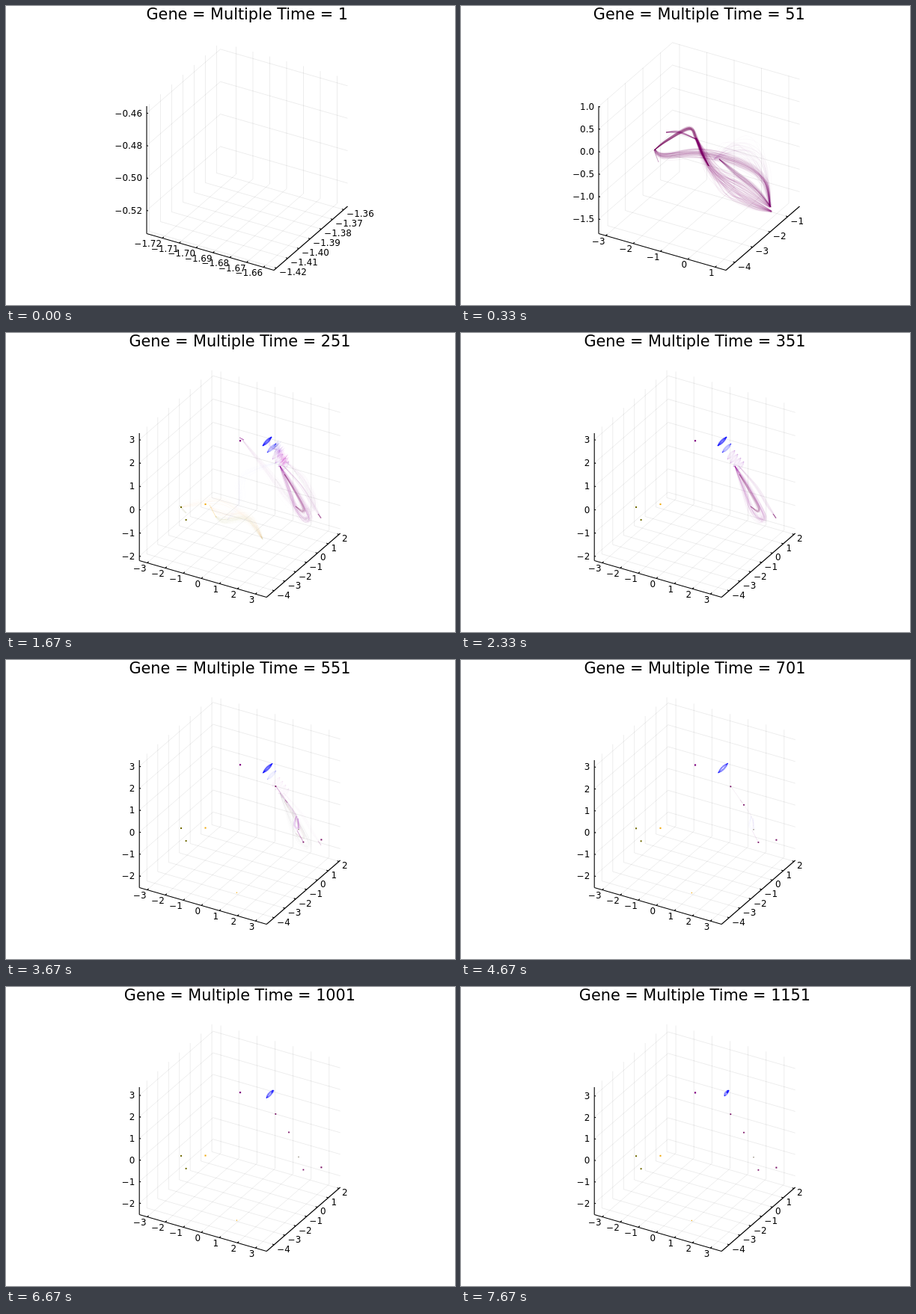
Recreate the animation shown at these times as an HTML page with a canvas. Size 600 by 400 pixels, loop 8000 ms.

```html
<!DOCTYPE html>
<html lang="en">
<head>
<meta charset="utf-8">
<title>Gene trajectories</title>
<style>
html, body { margin: 0; width: 100%; height: 100%; overflow: hidden; background: #fff; }
canvas { display: block; }
</style>
</head>
<body>
<canvas id="stage" width="600" height="400"></canvas>
<script>
const ctx = document.getElementById('stage').getContext('2d');
const STEPS = 24, LOOP = 8000;
const PURPLE = '128,0,128', PLUM = '120,15,100', LILAC = '165,80,190', BLUE = '0,0,255',
      ORANGE = '240,165,0', OLIVE = '110,105,0', TAN = '200,165,100', GREY = '145,135,120';

// Plot box edges in pixels: x runs right and down, y right and up, z up
const W = 170, FALL = 49, DEPTH = 98.5, RISE = 85.5, H = 170.5, BASE = 304.5;

let seed;
function rnd() {
  seed = (seed * 1664525 + 1013904223) >>> 0;
  return seed / 4294967296;
}
const jitter = () => (rnd() + rnd() - 1) * 1.2;
const lerp = (a, b, t) => a + (b - a) * t;
const ramp = (i, from, to) => Math.max(0, Math.min(1, (i - from) / (to - from)));

function line(x1, y1, x2, y2) {
  ctx.beginPath();
  ctx.moveTo(x1, y1);
  ctx.lineTo(x2, y2);
  ctx.stroke();
}

// Smooth curve through the points
function curve(p) {
  ctx.beginPath();
  ctx.moveTo(...p[0]);
  for (let k = 0; k < p.length - 1; k++) {
    const b = p[k], c = p[k + 1], a = p[k - 1] || b, d = p[k + 2] || c;
    ctx.bezierCurveTo(b[0] + (c[0] - a[0]) / 6, b[1] + (c[1] - a[1]) / 6,
      c[0] - (d[0] - b[0]) / 6, c[1] - (d[1] - b[1]) / 6, ...c);
  }
  ctx.stroke();
}

// Thin strands along one path, tight at both ends and loose between them
function bundle(rgb, alpha, count, spread, ...path) {
  ctx.lineWidth = 0.7;
  ctx.strokeStyle = `rgba(${rgb},${alpha})`;
  for (let n = 0; n < count; n++) {
    const u = jitter(), v = jitter();
    curve(path.map(([x, y], k) => {
      const s = spread * (0.12 + Math.sin(Math.PI * k / (path.length - 1)));
      return [x + s * (0.7 * u + 0.5 * jitter()), y + s * (0.7 * v + 0.5 * jitter())];
    }));
  }
}

// Nested pointed lenses between two tips
function leaf(rgb, alpha, x1, y1, x2, y2, width, rings) {
  ctx.lineWidth = 1;
  ctx.strokeStyle = `rgba(${rgb},${alpha})`;
  const mx = (x1 + x2) / 2, my = (y1 + y2) / 2, len = Math.hypot(x2 - x1, y2 - y1);
  for (let n = 1; n <= rings; n++) {
    const f = width * n / rings / len, dx = (y2 - y1) * f, dy = (x2 - x1) * f;
    ctx.beginPath();
    ctx.moveTo(x1, y1);
    ctx.quadraticCurveTo(mx - dx, my + dy, x2, y2);
    ctx.quadraticCurveTo(mx + dx, my - dy, x1, y1);
    ctx.stroke();
  }
}

// Scribble of short slanted strokes, blue at the top and purple below
function tangle() {
  ctx.lineWidth = 0.8;
  for (let n = 0; n < 170; n++) {
    const t = rnd(), x = lerp(360, 373, t) + 2 * jitter(), y = lerp(149, 174, t) + 3 * jitter();
    const dx = 5 * rnd(), dy = dx + 2 * jitter();
    ctx.strokeStyle = `hsla(${lerp(240, 305, Math.min(1, t * 1.6))},75%,45%,.26)`;
    line(x - dx, y + dy, x + dx, y - dy);
  }
}

function early() {
  bundle(PLUM, 0.11, 60, 2.5, [258, 193], [275, 180], [305, 164], [314, 177], [322, 197], [331, 214]);
  bundle(PLUM, 0.08, 35, 2, [274, 169], [292, 169], [314, 178]);
  bundle(PLUM, 0.07, 75, 11, [314, 177], [334, 218], [360, 247], [388, 264], [415, 275]);
  bundle(PLUM, 0.07, 50, 10, [314, 177], [340, 220], [380, 243], [413, 269]);
  bundle(PLUM, 0.08, 65, 7, [259, 192], [270, 200], [320, 197], [375, 211], [405, 234], [413, 268]);
  bundle(PLUM, 0.09, 40, 4, [345, 205], [370, 226], [395, 246], [414, 269]);
  bundle(PURPLE, 0.04, 45, 16, [338, 205], [368, 192], [398, 210], [414, 268]);
  bundle(PLUM, 0.1, 6, 1, [258, 193], [264, 209]);
}

function lowerPaths(warm, cool) {
  bundle(warm, 0.055, 28, 6, [234, 233], [255, 228], [290, 226], [330, 255], [342, 275]);
  bundle(cool, 0.055, 65, 6, [280, 245], [291, 251], [321, 247], [334, 261], [343, 276]);
  bundle(TAN, 0.06, 35, 8, [273, 233], [290, 243], [320, 246], [342, 274]);
  bundle(ORANGE, 0.3, 4, 0.7, [272, 230], [281, 247]);
  bundle(OLIVE, 0.25, 5, 3, [232, 231], [237, 237], [241, 241]);
  bundle(LILAC, 0.035, 22, 9, [296, 250], [313, 228], [318, 192], [367, 172]);
}

function upperLoop() {
  bundle(LILAC, 0.06, 45, 8, [315, 142], [346, 181], [380, 224], [404, 238], [411, 228], [398, 196], [374, 172]);
  bundle(PURPLE, 0.035, 25, 5, [360, 195], [385, 228], [403, 238], [410, 222], [385, 184]);
  bundle(PURPLE, 0.6, 6, 0.7, [312, 140], [318, 143]);
  bundle(LILAC, 0.2, 10, 3, [353, 140], [352, 152], [362, 156]);
  tangle();
}

function lateLoop() {
  bundle(PURPLE, 0.045, 50, 5, [366, 178], [384, 205], [404, 242], [401, 250], [388, 236], [374, 198], [366, 178]);
  bundle(PLUM, 0.11, 16, 2.5, [372, 189], [385, 210], [397, 232], [397, 239], [387, 232]);
  bundle(PURPLE, 0.07, 9, 3, [371, 178], [394, 205], [409, 230], [421, 247]);
  bundle(PLUM, 0.35, 4, 0.6, [417, 242], [421, 248]);
  for (let k = 0; k < 4; k++)
    leaf(LILAC, 0.1, 356 + k * 4, 169 + k * 5, 366 + k * 4, 157 + k * 5, 6, 4);
  leaf(BLUE, 0.17, 349, 160, 361, 148, 5, 5);
}

function thinStrand() {
  bundle(PURPLE, 0.09, 6, 1, [360, 168], [374, 188], [388, 209], [391, 225]);
  bundle(PLUM, 0.3, 3, 0.5, [373, 187], [376, 191]);
  bundle(LILAC, 0.06, 22, 3, [388, 209], [385, 221], [391, 226], [390, 212]);
  bundle(PURPLE, 0.2, 3, 0.7, [389, 228], [397, 243]);
}

// rgb, x, y, half size, first step, settling distance
const DOTS = [
  [OLIVE, 234, 225, 1, 4, 8], [OLIVE, 240.6, 242, 1, 4, 8], [ORANGE, 266.5, 224.6, 1, 4, 4.5],
  [PURPLE, 313, 140.2, 1.1, 4, 4], [PLUM, 421.4, 240.4, 1, 9, 0], [ORANGE, 308.4, 311.2, 0.6, 9, 0],
  [PLUM, 360.3, 169, 0.9, 9, 0], [PLUM, 397.4, 243.6, 0.9, 9, 0], [GREY, 391, 226.5, 0.7, 9, 0],
  [PLUM, 378, 193.5, 0.9, 13, 0]
];

function dots(i) {
  const unsettled = 1 - ramp(i, 7, 9), drift = 1.2 * ramp(i, 11, 23);
  for (const [rgb, x, y, r, from, sink] of DOTS) {
    if (i < from) continue;
    ctx.fillStyle = `rgb(${rgb})`;
    ctx.fillRect(x - r, y + sink * unsettled + drift - r, 2 * r, 2 * r);
  }
}

function blueLeaf(i) {
  const thin = ramp(i, 8, 16), shrink = ramp(i, 17, 23);
  leaf(BLUE, lerp(lerp(0.45, 0.7, thin), 0.3, shrink), lerp(343, 351, shrink) + thin, lerp(151, 146, shrink),
    355 + 2 * thin, 139 - thin, 4.5, Math.round(5 - 4 * thin + 3 * shrink));
  if (shrink) leaf(BLUE, 0.6 * shrink, 355, 142, 358, 138, 2.5, 2);
}

function faded(alpha, paint) {
  if (alpha <= 0) return;
  ctx.globalAlpha = alpha;
  paint();
  ctx.globalAlpha = 1;
}

function trajectories(i) {
  seed = 97;
  if (i === 1) early();
  if (i < 2) return;
  faded(1 - ramp(i, 3, 6), () => {
    lowerPaths(...(i === 2 ? [PURPLE, PLUM] : [TAN, GREY]));
    upperLoop();
  });
  faded(ramp(i, 3, 5) * (1 - ramp(i, 8, 12)), lateLoop);
  faded(ramp(i, 8, 10) * (1 - ramp(i, 11, 15)), thinStrand);
  if (i > 3) {
    dots(i);
    blueLeaf(i);
  }
}

// Data limits of the axes, which grow with the trajectories
function limits(i) {
  if (i === 0) return [[-1.7293, -1.6538], [-1.4223, -1.3566], [-0.5343, -0.4557]];
  if (i === 1) return [[-3.26, 1.397], [-4.515, -0.324], [-1.824, 1.008]];
  const g = ramp(i, 3, 4.5);
  return [
    [-3.333 - 0.1 * g, 3.333 + 0.285 * g],
    [-4.625 - 0.076 * g, 1.977 + 0.135 * g],
    [-2.074 - 0.118 * g - 0.34 * ramp(i, 7, 9), 2.941 + 0.34 * g + 0.12 * ramp(i, 11, 23)]
  ];
}

// Ticks at multiples of the smallest round step that keeps them apart
function ticks([lo, hi]) {
  const span = hi - lo, power = 10 ** Math.floor(Math.log10(span / 7.7));
  const step = power * [1, 2, 5, 10].find(m => span / (m * power) < 7.7);
  const decimals = Math.max(0, -Math.floor(Math.log10(step) + 1e-9));
  const list = [];
  for (let k = Math.ceil(lo / step); k * step <= hi; k++)
    list.push([(k * step - lo) / span, (k * step).toFixed(decimals).replace('-', '−')]);
  return list;
}

function plot(i) {
  const left = [188, 184][i] || 178.2;
  const fx = left + W, fy = BASE + FALL, bx = left + DEPTH, by = BASE - RISE;
  const [x, y, z] = limits(i).map(ticks);
  const marks = [];

  ctx.lineWidth = 1;
  ctx.strokeStyle = 'rgba(0,0,0,.075)';
  for (const [f, text] of x) {
    const px = left + f * W, py = BASE + f * FALL;
    line(px, py, px + DEPTH, py - RISE);
    line(px + DEPTH, py - RISE, px + DEPTH, py - RISE - H);
    marks.push([px, py, 2, -1.7, text, -1, 7.2, 'right']);
  }
  for (const [f, text] of y) {
    const dx = f * DEPTH, dy = f * RISE;
    line(left + dx, BASE - dy, fx + dx, fy - dy);
    line(left + dx, BASE - dy, left + dx, BASE - dy - H);
    marks.push([fx + dx, fy - dy, -2.5, -0.7, text, 3.9, 5.5, 'left']);
  }
  for (const [f, text] of z) {
    const d = f * H;
    line(left, BASE - d, bx, by - d);
    line(bx, by - d, bx + W, by + FALL - d);
    marks.push([left, BASE - d, 2, 0.5, text, -6, 0, 'right']);
  }

  trajectories(i);

  ctx.strokeStyle = ctx.fillStyle = '#000';
  ctx.lineWidth = 1.1;
  line(left, BASE - H, left, BASE);
  line(left, BASE, fx, fy);
  line(fx, fy, fx + DEPTH, fy - RISE);
  ctx.font = '11.9px "DejaVu Sans", sans-serif';
  for (const [px, py, dx, dy, text, tx, ty, align] of marks) {
    line(px, py, px + dx, py + dy);
    ctx.textAlign = align;
    ctx.fillText(text, px + tx, py + ty + 4.4);
  }
  ctx.font = '20.8px "DejaVu Sans", sans-serif';
  ctx.textAlign = 'center';
  ctx.fillText('Gene = Multiple Time = ' + (1 + 50 * i), left + (W + DEPTH) / 2, 18.4);
}

let shown = -1;
function draw() {
  // Steps fall on whole hundredths of a second, so lead by a few ms
  const i = Math.floor((performance.now() + 4) % LOOP * STEPS / LOOP);
  if (i !== shown) {
    shown = i;
    ctx.fillStyle = '#fff';
    ctx.fillRect(0, 0, 600, 400);
    plot(i);
  }
  requestAnimationFrame(draw);
}
draw();
</script>
</body>
</html>
```
